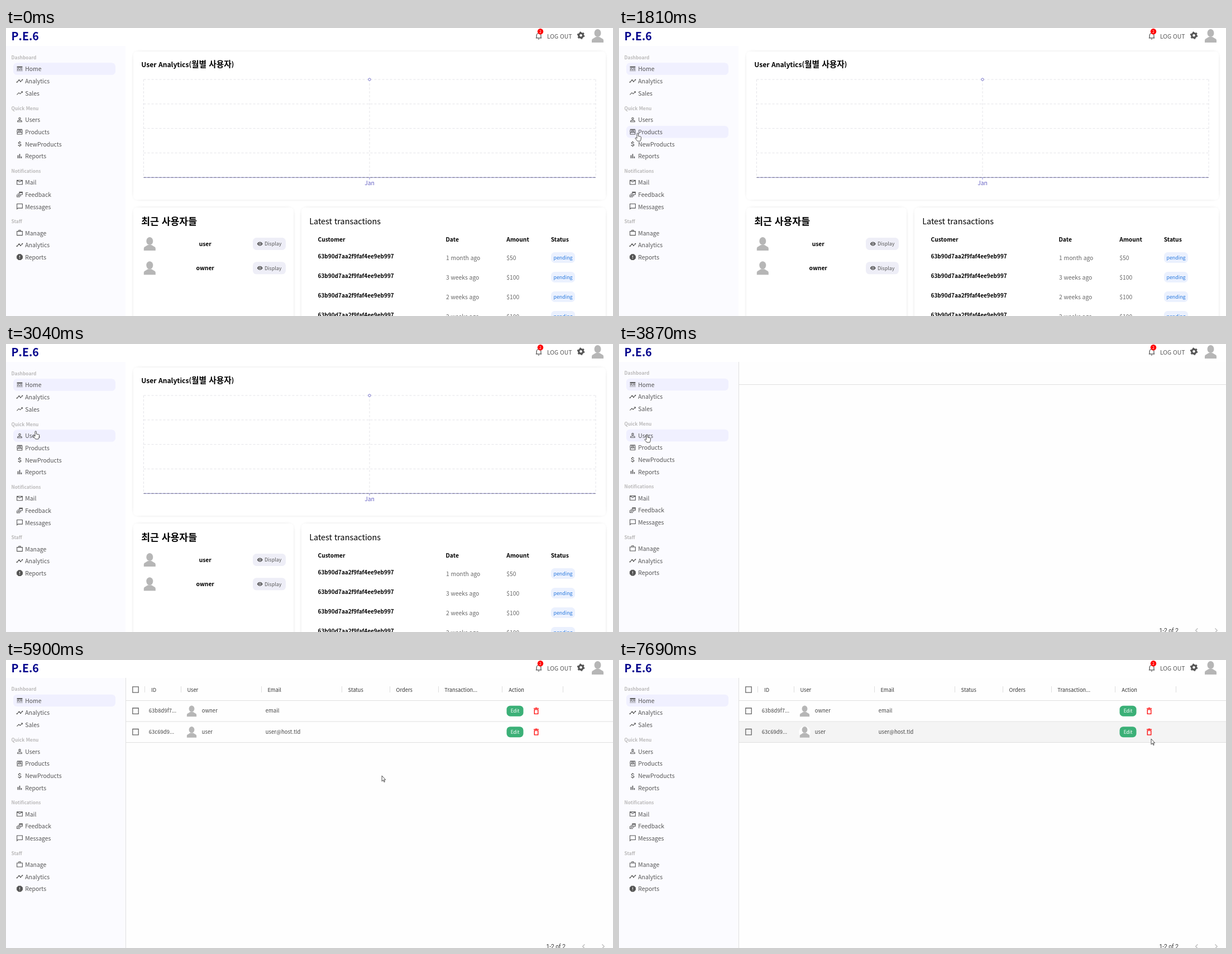
An HTML page for the animation above (8 s loop, 1087 px wide and 515 px high).

```html
<!DOCTYPE html>
<html lang="ko">
<head>
<meta charset="utf-8">
<title>Dashboard</title>
<style>
html, body { margin: 0; width: 100%; height: 100%; overflow: hidden; background: #fff; }
svg { display: block; width: 1087px; height: 515px; font-family: "Noto Sans CJK KR", "Noto Sans", sans-serif; }
</style>
</head>
<body>
<svg id="stage" viewBox="0 0 1087 515"></svg>
<script>
const LOOP = 8000, GREY = '#555';

const icons = {
  line: '<path d="M3 6h18" stroke-width="4"/><path d="M3 11h8m2 0h8M3 15h5m1.5 0h5m1.5 0h5M3 19h2m2 0h2m2 0h2m2 0h2m2 0h2"/>',
  timeline: '<path d="M3 16l7-7 5 5 6-6"/><path d="M3 16h0m7-7h0m5 5h0m6-6h0" stroke-width="4" stroke-linecap="round"/>',
  trend: '<path d="M2.7 17.3l6.7-6.7 4 4 7-7"/><path d="M16 6h6v6z" fill="currentColor" stroke="none"/>',
  person: '<circle cx="12" cy="8" r="3"/><path d="M5 19v-2c0-1.6 4-3 7-3s7 1.4 7 3v2z"/>',
  store: '<path d="M4 12v8h16v-8M3.5 11l1-7h15l1 7a2.5 2.5 0 0 1-5.5 0 3 3 0 0 1-6 0 2.7 2.7 0 0 1-5.5 0zM12 4v7M8.5 4v7m7-7v7"/>',
  money: '<path d="M12 3v3m0 12v3M16 8.5C16 7 14.5 6 12 6S8 7 8 9c0 4 8.5 2 8.5 6 0 2-2 3-4.5 3s-4.5-1-4.5-3"/>',
  bars: '<path d="M6.5 9v10M12 5v14M17.5 13v6" stroke-width="3"/>',
  mail: '<path d="M3 5h18v14H3zl9 6 9-6"/>',
  feed: '<path d="M11 4h10v8H11zM11 6h10M7 8v8h10M3 12v8h10"/>',
  chat: '<path d="M3 3h18v14H6l-3 3z"/>',
  work: '<path d="M3 7h18v13H3zM9 7V3h6v4"/>',
  report: '<path d="M8.3 3h7.4L21 8.3v7.4L15.7 21H8.3L3 15.7V8.3z" fill="currentColor"/><path d="M12 7v6m0 2v2" stroke="#fff"/>',
  bell: '<path d="M6 17v-6a6 6 0 0 1 12 0v6M4 18h16M10.5 21h3M12 3v2"/>',
  gear: '<circle cx="12" cy="12" r="6" stroke-width="5"/><circle cx="12" cy="12" r="9" stroke-width="3" stroke-dasharray="4.2 5.22"/>',
  eye: '<path d="M1 12q4-7.5 11-7.5T23 12q-4 7.5-11 7.5T1 12z" fill="currentColor" stroke="none"/><circle cx="12" cy="12" r="4" stroke="#eeeef7"/>',
  trash: '<path d="M7 8v12h10V8zM5 5h14M9.5 4h5"/>',
  box: '<path d="M4 4h16v16H4z"/>'
};

const icon = (name, cx, cy, size, color = GREY) =>
  `<g transform="translate(${cx - size / 2} ${cy - size / 2}) scale(${size / 24})" fill="none" stroke="currentColor" stroke-width="2" color="${color}">${icons[name]}</g>`;
const text = (x, y, str, size, fill = GREY, weight = 400, extra = '') =>
  `<text x="${x}" y="${y}" font-size="${size}" fill="${fill}" font-weight="${weight}" ${extra}>${str}</text>`;
const rect = (x, y, w, h, fill, r = 0, extra = '') =>
  `<rect x="${x}" y="${y}" width="${w}" height="${h}" rx="${r}" fill="${fill}" ${extra}/>`;
const path = (d, stroke, extra = '') => `<path d="${d}" fill="none" stroke="${stroke}" ${extra}/>`;
const avatar = (cx, top, scale = 1) =>
  `<g transform="translate(${cx} ${top}) scale(${scale})" fill="#b6b6b6"><circle cy="12" r="12.6" fill="#fff"/><ellipse cy="7" rx="6" ry="7"/>
  <path d="M-10.5 24v-4c0-3 5-4 7-6h7c2 2 7 3 7 6v4z"/></g>`;
const card = (x, y, w, h) =>
  rect(x + 6.5, y + 6.5, w - 13, h - 13, '#000', 0, 'opacity=".75" style="filter:blur(4.9px)"') + rect(x, y, w, h, '#fff', 6.5);
const middle = 'text-anchor="middle"';

// Sidebar: heading y, heading, then [icon, label] entries
const menu = [
  [53, 'Dashboard', ['line', 'Home'], ['timeline', 'Analytics'], ['trend', 'Sales']],
  [144, 'Quick Menu', ['person', 'Users'], ['store', 'Products'], ['money', 'NewProducts'], ['bars', 'Reports']],
  [256, 'Notifications', ['mail', 'Mail'], ['feed', 'Feedback'], ['chat', 'Messages']],
  [346.3, 'Staff', ['work', 'Manage'], ['timeline', 'Analytics'], ['report', 'Reports']]
];
const itemYs = [];
let sidebar = '';
for (const [y, heading, ...items] of menu) {
  sidebar += text(9.5, y + 3, heading, 8.4, '#bbbaba', 700);
  items.forEach(([name, label], i) => {
    const cy = y + 20.3 + i * 21.7;
    itemYs.push(cy);
    sidebar += icon(name, 24.5, cy - .3, 13) + text(34.2, cy + 4, label, 10.45);
  });
}

const topbar = rect(0, 0, 1087, 32, '#fff') + text(9.6, 22.3, 'P.E.6', 19.5, '#00008b', 700) +
  icon('bell', 954, 14, 15.6) + '<circle cx="957" cy="6.3" r="5.2" fill="red"/>' +
  text(957, 8.8, 2, 6.8, '#fff', 400, middle) + text(969, 18.7, 'LOG OUT', 10.4) +
  icon('gear', 1029.5, 13.3, 15.6) + avatar(1059.5, 2);

function homePage() {
  const grid = 'stroke-width=".8" stroke-dasharray="4 3"';
  let s = card(228, 42, 846, 265) + card(228, 321, 287, 300) + card(529, 321, 545, 300);
  s += text(242.3, 70.3, 'User Analytics(<tspan font-size="14.7">월별 사용자</tspan>)', 12.1, '#000', 700);
  for (let i = 0; i < 5; i++) s += path(`M246.5 ${92 + i * 43.8}H1056`, '#dedee2', grid);
  for (const x of [246.5, 651, 1056]) s += path(`M${x} 92V267`, '#dedee2', grid);
  s += path('M246.5 267.3H1056M651 267v4', '#8885cc', 'stroke-width=".9"') + path('M246.5 267.3H1056', '#667', grid);
  s += '<circle id="dot" cx="651" cy="92" r="2.2" fill="#fff" stroke="#5550bd" stroke-width=".8"/>';
  s += text(651, 281, 'Jan', 10.4, '#6763c4', 400, middle);

  s += text(242.3, 352.3, '최근 사용자들', 17.2, '#000', 700);
  ['user', 'owner'].forEach((name, i) => {
    const y = 386 + i * 43.3;
    s += avatar(257.3, y - 12) + text(356.7, y + 4, name, 10.3, '#000', 700, middle) +
      rect(442, y - 11, 59, 22, '#eeeef7', 6.5) + icon('eye', 454.7, y, 11) + text(463, y + 3.3, 'Display', 8.9);
  });

  s += text(543.2, 351, 'Latest transactions', 14.4, '#000', 500);
  [[558.5, 'Customer'], [787.5, 'Date'], [896.3, 'Amount'], [975.7, 'Status']]
    .forEach(([x, label]) => s += text(x, 382.3, label, 10.3, '#000', 700));
  [['1 month', 50], ['3 weeks', 100], ['2 weeks', 100], ['2 weeks', 100]].forEach(([age, sum], i) => {
    const y = 411 + i * 35;
    s += text(558.5, y + 1, '63b90d7aa2f9faf4ee9eb997', 10, '#000', 700) +
      text(788, y + 4.3, age + ' ago', 10.3, '#666', 300) + text(896.3, y + 4.3, '$' + sum, 10.3, '#666', 300) +
      rect(976, y - 10, 43, 19, '#ebf1fe', 6.5) + text(997.5, y + 2.7, 'pending', 8.9, '#2a7ade', 400, middle);
  });
  return s;
}

const rowTops = [72.5, 110];
const gridFrame = path('M214.5 32V515M214 72.5H1087', '#e0e0e0') +
  text(967.5, 515.5, '1-2 of 2', 10.2, '#333', 400, 'font-family="Roboto, sans-serif"') +
  path('M1036.3 508.5l-3.7 3.7 3.7 3.7M1067.5 508.5l3.7 3.7-3.7 3.7', '#b5b5b5', 'stroke-width="1.2"');

function gridContent() {
  let s = icon('box', 232, 53, 15.6, '#666');
  [[260, 'ID'], [324.4, 'User'], [468.4, 'Email'], [612.6, 'Status'], [698.6, 'Orders'], [785.3, 'Transaction...'], [900.3, 'Action']]
    .forEach(([x, label]) => s += text(x, 56.6, label, 9.3, '#333', 500));
  for (const x of [248.5, 313.5, 457.5, 601.5, 687.5, 774.5, 888.5, 997.5]) s += path(`M${x} 47v11`, '#ddd');
  [['63b8d9f7...', 'owner', 'email'], ['63c69d9...', 'user', 'user@host.tld']].forEach(([id, name, mail], i) => {
    const y = rowTops[i] + 18.7, cell = (x, str) => text(x, y + 3.2, str, 9.4, '#444', 400, 'letter-spacing=".1"');
    s += path(`M215 ${rowTops[i] + 37.5}H1087`, '#e0e0e0') + icon('box', 232, y, 15.6, '#666') +
      cell(255.7, id) + avatar(332.5, y - 9.7, .82) + cell(350.7, name) + cell(464.7, mail) +
      rect(896.5, y - 9.5, 30, 19, '#3bb077', 6.5) + text(911.5, y + 3, 'Edit', 8.5, '#fff', 400, middle) +
      icon('trash', 949.5, y, 15.6, 'red');
  });
  return s;
}

const stage = document.getElementById('stage');
stage.innerHTML = `<g id="home">${homePage()}</g>
  <g id="users">${rect(214, 32, 873, 483, '#fefefe')}${gridFrame}
    <g id="rows">${rect(215, 0, 872, 37, '#f4f4f4', 0, 'id="rowHover"')}${gridContent()}</g></g>
  ${rect(0, 32, 214, 483, '#fbfbff')}
  <g id="side">${rect(13, itemYs[0] - 11, 183, 21.5, '#f0f0ff', 6.5)}${rect(13, 0, 183, 21.5, '#f0f0ff', 6.5, 'id="itemHover"')}${sidebar}</g>
  ${topbar}
  <g id="cursor"><circle id="click" r="9" fill="#ff0" opacity=".45"/>
    <path id="arrow" d="M0 0v10l2.3-2.2 1.6 3.6 1.4-.6-1.6-3.5H6.6z" fill="#fff" stroke="#222" stroke-width=".8"/>
    <path id="hand" d="M-1 6V1a1.2 1.2 0 0 1 2.4 0v4l4 .8c1 .3 1.3 1 1.2 2l-.6 4-1 2.2h-5L-3.8 9.5c-.6-1 .6-2 1.6-1.2L-1 9z" fill="#fff" stroke="#222" stroke-width=".8"/></g>`;

// Pointer stops: [ms, x, y]
const route = [
  [850, 936, 292], [1250, 500, 240], [1610, 40, 200], [1810, 33, 188], [2100, 60, 265], [2420, 60, 132],
  [2490, 85, 115], [2750, 30, 140], [3040, 53, 156], [3260, 50, 162], [4520, 50, 162], [5000, 417.5, 305],
  [5290, 474, 312], [5620, 474, 312], [6080, 800, 140], [6250, 905, 95], [6460, 885, 165], [6590, 876, 167],
  [6900, 871, 160], [7270, 941, 158], [7690, 953, 141], [LOOP, 953, 141]
];
function pointer(t) {
  const i = Math.max(1, route.findIndex(stop => stop[0] > t));
  const [t0, x0, y0] = route[i - 1], [t1, x1, y1] = route[i];
  const k = Math.max(0, (t - t0) / (t1 - t0));
  return [x0 + (x1 - x0) * k, y0 + (y1 - y0) * k];
}

const $ = id => document.getElementById(id);
const show = (id, on) => $(id).setAttribute('visibility', on ? 'inherit' : 'hidden');

function draw(now) {
  const t = now % LOOP, [x, y] = pointer(t);
  const visible = t >= 850, onUsers = t >= 3870, shift = onUsers ? -.6 : 0;
  const item = visible && x > 13 && x < 196 ? itemYs.findIndex(cy => Math.abs(y - cy - shift) < 10.8) : -1;
  const row = t >= 4000 && x > 215 ? rowTops.findIndex(top => y >= top && y < top + 37.5) : -1;
  const overButton = row >= 0 && Math.abs(y - rowTops[row] - 18.7) < 9.5 && (Math.abs(x - 911.5) < 15 || Math.abs(x - 949.5) < 8);
  const overChart = visible && !onUsers && x > 246 && x < 1056 && y > 92 && y < 267;
  const hand = item >= 0 || overButton;

  show('home', !onUsers);
  show('users', onUsers);
  show('rows', t >= 4000);
  $('side').setAttribute('transform', `translate(0 ${shift})`);
  show('itemHover', item >= 0);
  if (item >= 0) $('itemHover').setAttribute('y', itemYs[item] - 11);
  show('rowHover', row >= 0);
  if (row >= 0) $('rowHover').setAttribute('y', rowTops[row] + .5);
  $('dot').setAttribute('r', overChart ? 2.8 : 2.2);
  $('dot').setAttribute('fill', overChart ? '#5550bd' : '#fff');

  show('cursor', visible);
  $('cursor').setAttribute('transform', `translate(${x} ${y})`);
  show('hand', visible && hand);
  show('arrow', visible && !hand);
  show('click', t >= 3530 && t < 3730);
}

function loop() {
  draw(performance.now());
  requestAnimationFrame(loop);
}
loop();
</script>
</body>
</html>
```
